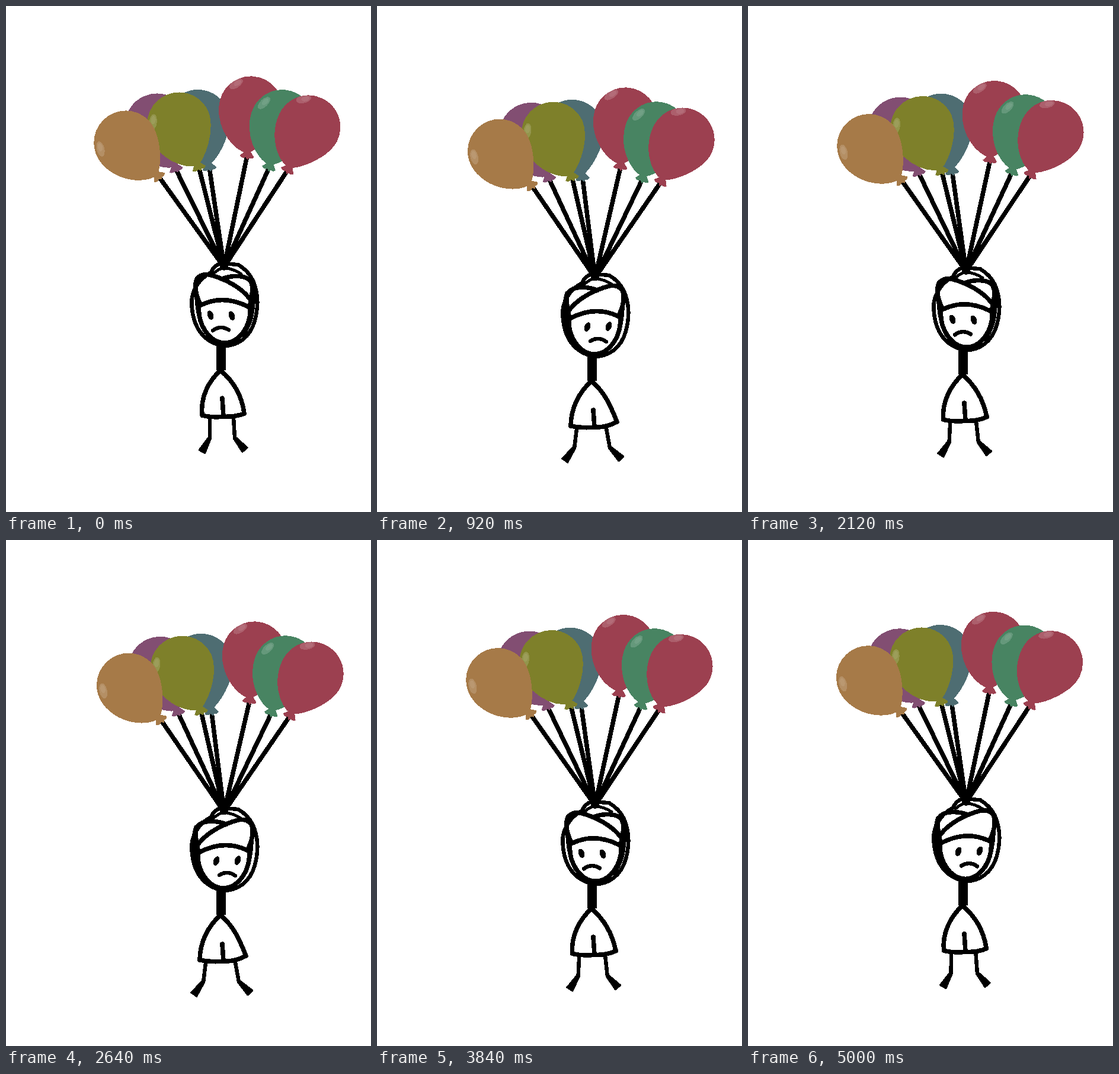
An HTML page that plays this animation: 616 by 853 pixels, repeating every 5.04 s.

```html
<!DOCTYPE html>
<html lang="en">
<head>
<meta charset="utf-8">
<title>Balloons</title>
<style>
html, body { margin: 0; width: 100%; height: 100%; overflow: hidden; background: #fff; }
svg { display: block; width: 616px; height: 853px; }
.ink { fill: none; stroke: #000; stroke-width: 7.6; stroke-linecap: round; stroke-linejoin: round; }
</style>
</head>
<body>
<svg viewBox="0 0 616 853" shape-rendering="crispEdges">
  <g id="figure">
    <g id="bunch"></g>
    <g class="ink">
      <path d="M363 572C336 566 316 545 313.5 505C311.5 484 323 461 346 449Q351 437 362 434" stroke-width="6.5"/>
      <path d="M363 573C392 574 412 558 420 530C426.500 506 426 484 417 463Q409 446 392 436L370 434" stroke-width="6.5"/>
      <path d="M350 451Q358 443 368 441Q384 443 396 451" stroke-width="5"/>
      <path d="M363 573V614" stroke-width="16" stroke-linecap="butt"/>
      <path id="shorts"/>
      <path id="legs" stroke-width="6.5"/>
      <path id="feet" fill="#000" stroke-width="3"/>
    </g>
    <g id="head" class="ink">
      <path d="M326 503C322 536 343 567 369 568C395 567 414 538 412 507"/>
      <path d="M329 504Q368 485 411 508"/>
      <path d="M329 504C321 490 317 472 322 460Q330 450 344 453C368 459 397 474 411 493"/>
      <path d="M364 460C383 453 405 453 413 464C419 475 414 490 411 508"/>
      <path d="M416 465Q422 484 417 504Q416 533 400 555" stroke-width="6"/>
      <path d="M320 473Q319 520 334 548" stroke-width="4"/>
      <path d="M349 547Q362 537 376 546" stroke-width="6.5"/>
      <g fill="#000" stroke="none">
        <ellipse cx="345" cy="521" rx="5" ry="8" transform="rotate(-20 345 521)"/>
        <ellipse cx="381" cy="522" rx="5" ry="8" transform="rotate(-20 381 522)"/>
      </g>
    </g>
  </g>
</svg>
<script>
const LOOP = 5040, CYCLE = 1720, STEP = 40;
const TOP = 60, LOW = 840;          // turning points inside one bob
const KNOT = [368, 440];
const $ = id => document.getElementById(id);

// neck x, neck y, tilt, colour, bright-spot x, y, angle
const spot = [-38, -98, -60], redSpot = [-28, -115, -38];
const balloons = [
  [285, 271, -23.5, '#824e72', spot],
  [342, 268.5, -14, '#4e6d72', spot],
  [323.5, 268.5, -24.5, '#7e802a', spot],
  [255, 285, -44, '#a67a48', spot],
  [407, 248, 4.6, '#9c4050', redSpot],
  [445, 268, 16, '#488462', spot],
  [477, 272.5, 26, '#9c4050', redSpot]
];

const bulb = 'M0 0C-22 -2 -54 -34 -54 -75C-54 -106 -30 -130 0 -130' +
  'C30 -130 54 -106 54 -76C53 -42 15 -4 0 0Z';
const tie = 'M-4 -4L-12 5Q-8 10 -2 7L1 11L4 8Q9 10 12 6L5 -4Z';

function balloonMarkup([x, y, tilt, colour, [sx, sy, turn]]) {
  return `<g transform="translate(${x} ${y}) rotate(${tilt})" fill="${colour}">
    <path d="${bulb}"/><path d="${tie}"/>
    <g transform="translate(${sx} ${sy}) rotate(${turn})" fill="#fff">
      <ellipse rx="13" ry="6.5" fill-opacity=".16"/>
      <ellipse cx="3" rx="7" ry="4" fill-opacity=".08"/>
    </g></g>`;
}

function stringMarkup([x, y, tilt]) {
  const a = tilt * Math.PI / 180;
  const d = `M${x - 6 * Math.sin(a)} ${y + 6 * Math.cos(a)}L${KNOT.join(' ')}`;
  return `<path class="ink" d="${d}"/>`;
}

$('bunch').innerHTML = balloons.map(stringMarkup).join('') +
  `<circle cx="${KNOT[0]}" cy="${KNOT[1] - 2}" r="7.5"/>` +
  balloons.map(balloonMarkup).join('');

const mix = (a, b, k) => a + (b - a) * k;
const ease = k => (1 - Math.cos(Math.PI * k)) / 2;

// 0 at the highest point, 1 at the lowest
function sink(t) {
  const p = (t - TOP + CYCLE) % CYCLE, fall = LOW - TOP;
  return p < fall ? ease(p / fall) : 1 - ease((p - fall) / (CYCLE - fall));
}

function wedge(ax, ay, tx, ty) {
  const len = Math.hypot(tx - ax, ty - ay);
  const nx = (ay - ty) / len, ny = (tx - ax) / len;
  const at = (x, y, w) => `${x + nx * w} ${y + ny * w}`;
  return `M${at(ax, ay, 2)}L${at(tx, ty, 5.5)}L${at(tx, ty, -5.5)}L${at(ax, ay, -2)}Z`;
}

function drawLegs(s) {
  const m = (a, b) => mix(a, b, s);
  const left = [m(344, 333), m(728, 726), m(331, 317), m(751, 748)];
  const right = [m(386, 393), m(728, 726), m(403, 412), m(748, 745)];
  $('legs').setAttribute('d',
    `M${m(344, 337)} 694L${left[0]} ${left[1]}M${m(384, 387)} 694L${right[0]} ${right[1]}`);
  $('feet').setAttribute('d', wedge(...left) + wedge(...right));

  const l = m(331, 327), r = m(402, 405), hem = m(687, 683);
  $('shorts').setAttribute('d',
    `M362 614C341 633 ${m(328, 327)} 660 ${l} 690Q347 694 366 692Q386 693 ${r} ${hem}` +
    `C${m(398, 394)} 655 384 633 362 614M365 ${m(661, 663)}L367 691`);
}

function draw(time) {
  const t = Math.floor(time % LOOP / STEP) * STEP;
  const s = sink(t % CYCLE);
  $('figure').setAttribute('transform', `translate(0 ${18.4 * s})`);
  $('bunch').setAttribute('transform', `rotate(${1.32 * s} ${KNOT.join(' ')})`);
  const facingRight = t % CYCLE >= CYCLE / 2;
  $('head').setAttribute('transform', facingRight ? 'translate(736 1) scale(-1 1)' : '');
  drawLegs(s);
}

const start = performance.now();
function tick() {
  draw(performance.now() - start);
  requestAnimationFrame(tick);
}
tick();
</script>
</body>
</html>
```
